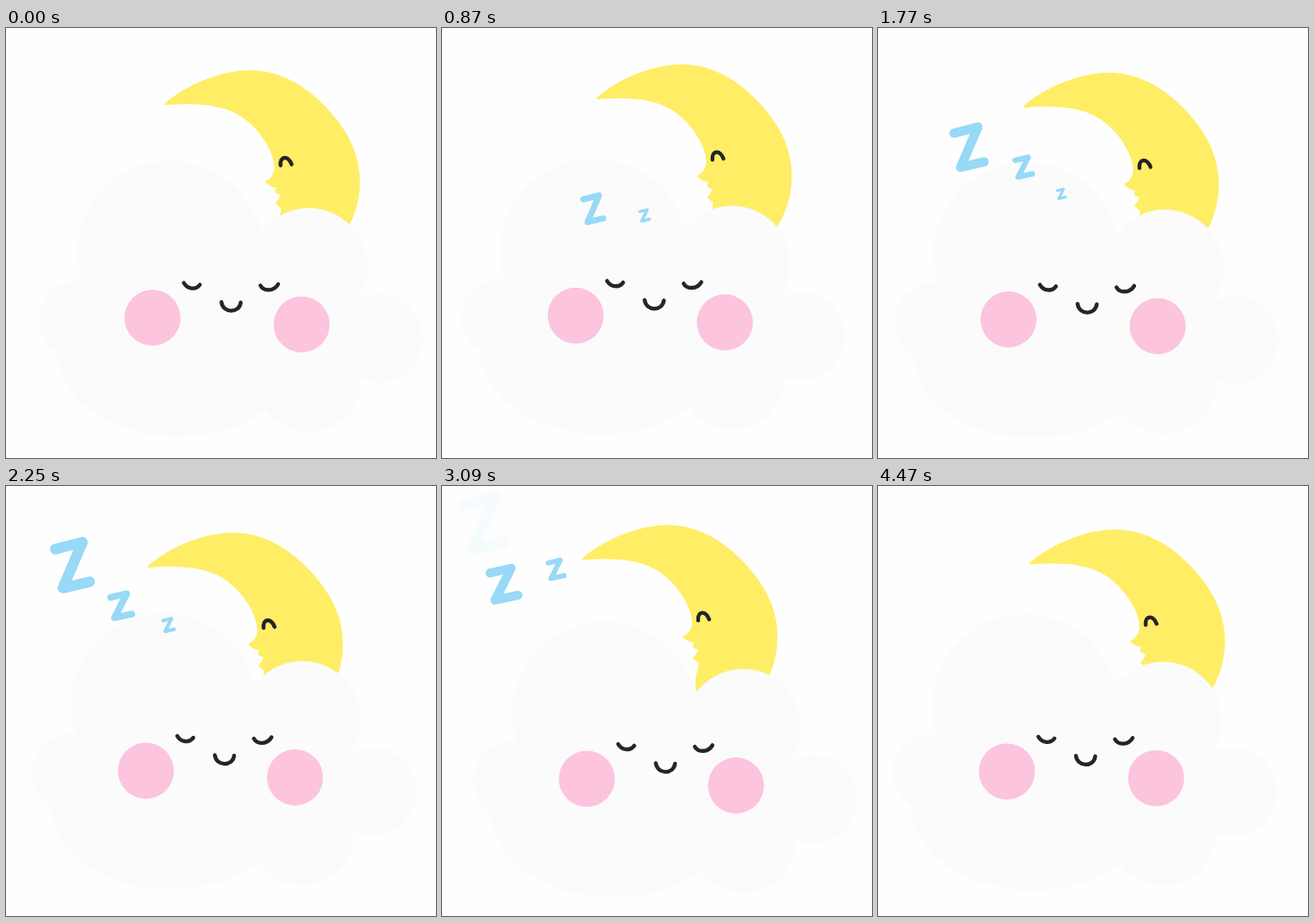
An HTML page for the animation above (4.5 s loop, 480 by 480 pixels).

```html
<!DOCTYPE html>
<html lang="en">
<head>
<meta charset="utf-8">
<title>Sleepy cloud</title>
<style>
  html, body { margin: 0; width: 100%; height: 100%; overflow: hidden; background: #fefefe; }
  svg { display: block; width: 100%; height: 100%; }
  .line { fill: none; stroke: #232526; stroke-width: 4.3; stroke-linecap: round; }
  .z { fill: none; stroke: #97d9f6; stroke-width: 11.8; stroke-linecap: round; stroke-linejoin: round; }
</style>
</head>
<body>
<svg viewBox="0 0 480 480">
  <g id="moon">
    <path fill="#ffed66" d="M177 84
      C204 60 245 46.5 272 46.5 C301 46.5 331 60 357.5 88
      C384.5 117 395 143 395 171 C395 205 380 240 340 265
      L312 262 Q306 250 305 236 Q301.5 221 305 211 Q307 206 307 200.5
      Q303 198 300.5 195 Q305 191 306.5 186 Q303 184.5 300 182.5
      Q300.5 180 302 178 Q294 177 289 171 Q297 168 299.5 158
      C301 141 285 113 262 98 C240 84.5 213 83 179 85.5 Q176 85.5 177 84Z"/>
    <path class="line" d="M306.5 153 C305.5 142.5 314.5 141.5 318.8 151.8"/>
  </g>
  <g id="cloud">
    <g fill="#fbfbfb">
      <ellipse cx="183.5" cy="250" rx="104" ry="102"/>
      <circle cx="338" cy="266.5" r="65.5"/>
      <circle cx="416" cy="346.5" r="49.5"/>
      <ellipse cx="338" cy="395" rx="58" ry="56"/>
      <ellipse cx="192" cy="360" rx="136" ry="96"/>
      <circle cx="79.5" cy="325.5" r="43.5"/>
      <rect x="120" y="250" width="275" height="148"/>
    </g>
    <g fill="#fcc4dd">
      <circle cx="163.5" cy="323.5" r="31.3"/>
      <circle cx="330" cy="331" r="31.3"/>
    </g>
    <path class="line" d="M198.5 284.7 C203 292 212 292.5 216.5 286.5
      M284 287.5 C287 294 299 294.5 303.8 286
      M240.5 306 C242 318.7 260.5 319 262 306.5"/>
  </g>
  <path class="z" d="M-19 -18 L11.5 -26 L-10.5 25.5 L19.5 18.5"/>
  <path class="z" d="M-18.5 -15 L9.5 -21.5 L-12 21 L18.5 14.3"/>
  <path class="z" d="M-18.5 -15 L9.5 -21.5 L-12 21 L18.5 14.3"/>
</svg>
<script>
const LOOP = 4500;
const Z_WIDTH = 50;
const FADE_IN = 150, FADE_OUT = 310;
const moon = document.getElementById('moon');
const cloud = document.getElementById('cloud');
const letters = [...document.querySelectorAll('.z')];

const clamp = v => Math.min(1, Math.max(0, v));
const mix = ([a, b], u) => a + (b - a) * u;
const wave = (t, period, peak = 0) => Math.cos(2 * Math.PI * (t - peak) / period);

const linear = u => u;
const easeIn = p => u => u ** p;
const easeOut = p => u => 1 - (1 - u) ** p;
const lateSettle = u => { const v = u ** 1.25; return v * v * (3 - 2 * v); };

// Letters rise out of the cloud; the easings bend each path its own way
const flights = [
  { begin: 0, end: 3115, x: [250, 46], y: [221, 42], size: [11, 56],
    easeX: easeOut(1.55), easeY: lateSettle, grow: easeOut(1.55) },
  { begin: 650, end: 3490, x: [242, 41], y: [225, 106], size: [12, 47],
    easeX: linear, easeY: easeOut(1.75), grow: linear },
  { begin: 950, end: 3960, x: [226, 56], y: [220, 19], size: [5.5, 31.5],
    easeX: easeIn(1.6), easeY: easeIn(1.35), grow: linear }
];

const move = (el, x, y, s = 1) =>
  el.setAttribute('transform', `translate(${x} ${y}) scale(${s})`);

function drawLetter(el, f, t) {
  const u = clamp((t - f.begin) / (f.end - f.begin));
  move(el, mix(f.x, f.easeX(u)), mix(f.y, f.easeY(u)), mix(f.size, f.grow(u)) / Z_WIDTH);
  el.setAttribute('opacity',
    clamp((t - f.begin) / FADE_IN) * clamp((f.end - t) / FADE_OUT));
}

function draw(t) {
  move(moon, 10.5 * (wave(t, 5640) - 1), -0.3 - 5.8 * wave(t, 2820, 760));
  move(cloud, 10.5 * (wave(t, 2820) - 1), -0.6 - 5.5 * wave(t, 1880, 500));
  letters.forEach((el, i) => drawLetter(el, flights[i], t));
}

const start = performance.now();
function tick() {
  draw((performance.now() - start) % LOOP);
  requestAnimationFrame(tick);
}
tick();
</script>
</body>
</html>
```
